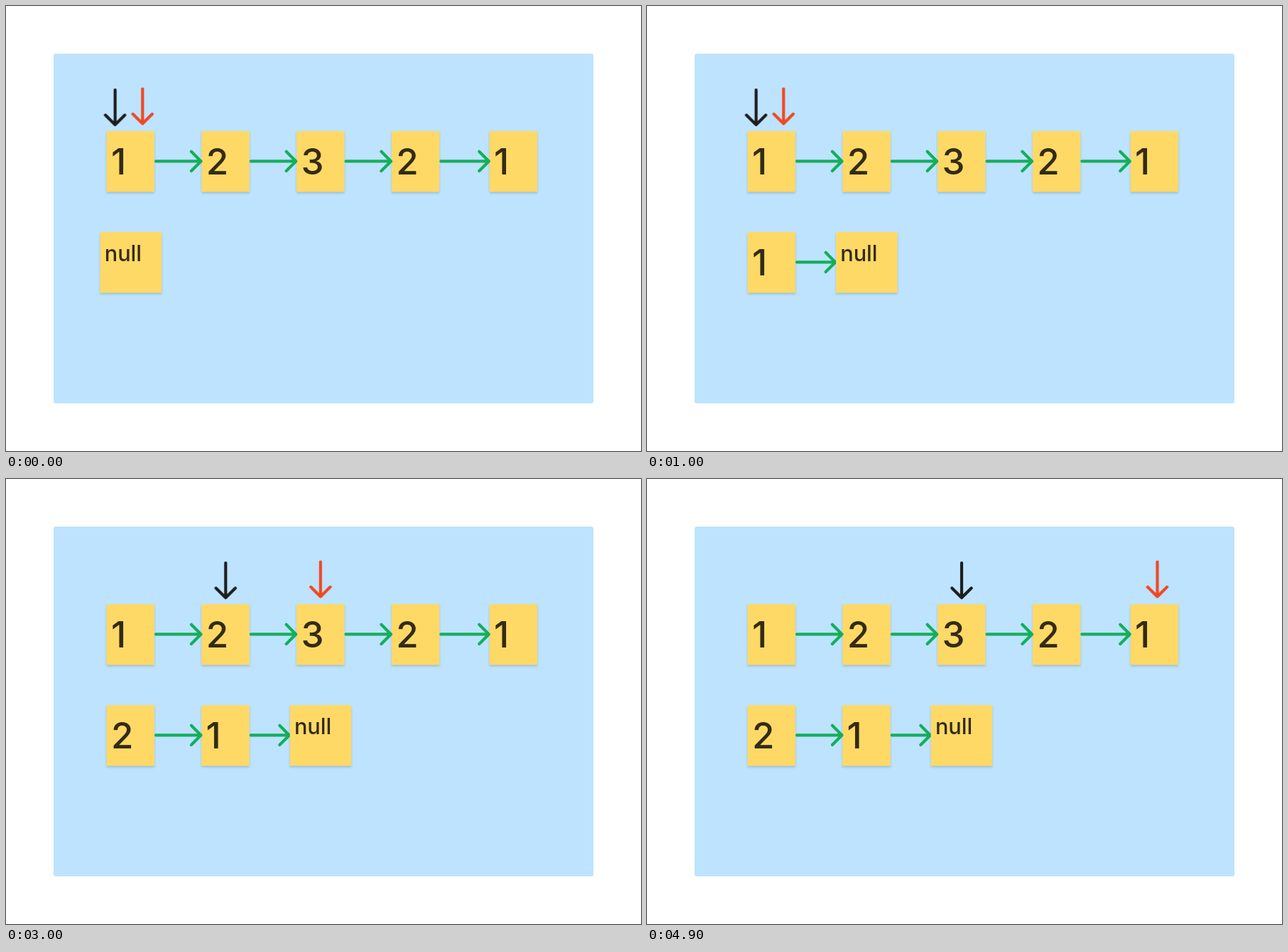
Write an HTML page that moves like this. It is 894x626 px and loops after 5500 ms.

```html
<!DOCTYPE html>
<html lang="en">
<head>
<meta charset="utf-8">
<title>Linked list, two pointers</title>
<style>
  html, body { margin: 0; width: 100%; height: 100%; overflow: hidden; background: #fff; }
  svg { display: block; width: 894px; height: 626px; }
  text {
    font: 500 51px Inter, sans-serif;
    font-optical-sizing: none;
    fill: #332b14;
  }
  text.small { font-size: 30.7px; }
  .note { fill: #ffd966; filter: drop-shadow(0 2.5px 1.5px rgba(0, 0, 0, .16)); }
  .arrow { fill: none; stroke-width: 4.2; stroke-linecap: round; stroke-linejoin: round; }
  .link { stroke: #14ae5c; }
  .slow { stroke: #1e1e1e; }
  .fast { stroke: #f24822; }

  .step { animation: 5.5s step-end infinite; }
  #slow { animation-name: slow; }
  #fast { animation-name: fast; }
  #end { animation-name: end; }
  #tail { animation-name: tail; }
  #first { animation-name: first; }
  #second { animation-name: second; }

  @keyframes slow {
    0% { transform: translateX(153.6px); }
    36.3636% { transform: translateX(309.2px); }
    72.7272% { transform: translateX(443px); }
  }
  @keyframes fast {
    0% { transform: translateX(192.2px); }
    36.3636% { transform: translateX(442.8px); }
    72.7272% { transform: translateX(718.5px); }
  }
  @keyframes end {
    0% { transform: translateX(-133.5px); }
    18.1818% { transform: none; }
  }
  @keyframes tail {
    0% { transform: none; }
    54.5454% { transform: translateX(133.7px); }
  }
  @keyframes first {
    0% { visibility: hidden; }
    18.1818% { visibility: visible; }
  }
  @keyframes second {
    0% { visibility: hidden; }
    54.5454% { visibility: visible; }
  }
</style>
</head>
<body>
<svg viewBox="0 0 894 626">
  <rect x="67" y="67" width="760" height="492" rx="3" fill="#bde3ff"/>
  <g id="list"></g>
  <g id="tail" class="step">
    <g id="first" class="step"></g>
    <g id="end" class="step"></g>
  </g>
  <g id="second" class="step"></g>
  <g id="slow" class="step"><path class="arrow slow" d="M0 118V167M-13.6 153.4L0 167L13.6 153.4"/></g>
  <g id="fast" class="step"><path class="arrow fast" d="M0 116.5V165.5M-13.6 151.9L0 165.5L13.6 151.9"/></g>
</svg>
<script>
  const TOP = 176, LOW = 318, WIDTH = 67.5, HEIGHT = 85.5;

  const add = (id, markup) =>
    document.getElementById(id).insertAdjacentHTML('beforeend', markup);

  const note = (x, y, label, width = WIDTH) =>
    `<rect class="note" x="${x}" y="${y}" width="${width}" height="${HEIGHT}" rx=".5"/>` +
    (width === WIDTH
      ? `<text x="${x + 6.4}" y="${y + 61.3}">${label}</text>`
      : `<text class="small" x="${x + 6.2}" y="${y + 41}">${label}</text>`);

  // Link from the right edge of the note at x to the left edge of the next
  const link = (x, next, y) => {
    const mid = y + 42.4, tip = next - 0.8, wing = 13.6;
    return `<path class="arrow link" d="M${x + WIDTH + 2} ${mid}H${tip}` +
      `M${tip - wing} ${mid - wing}L${tip} ${mid}L${tip - wing} ${mid + wing}"/>`;
  };

  const spots = [141.5, 275.3, 409, 542.8, 680.6];
  spots.forEach((x, i) => add('list', note(x, TOP, '12321'[i])));
  spots.slice(1).forEach((next, i) => add('list', link(spots[i], next, TOP)));

  const [head, next] = spots, nullX = 266;
  add('end', note(nullX, LOW, 'null', 86.5));
  add('first', note(head, LOW, '1') + link(head, nullX, LOW));
  add('second', note(head, LOW, '2') + link(head, next, LOW));
</script>
</body>
</html>
```
